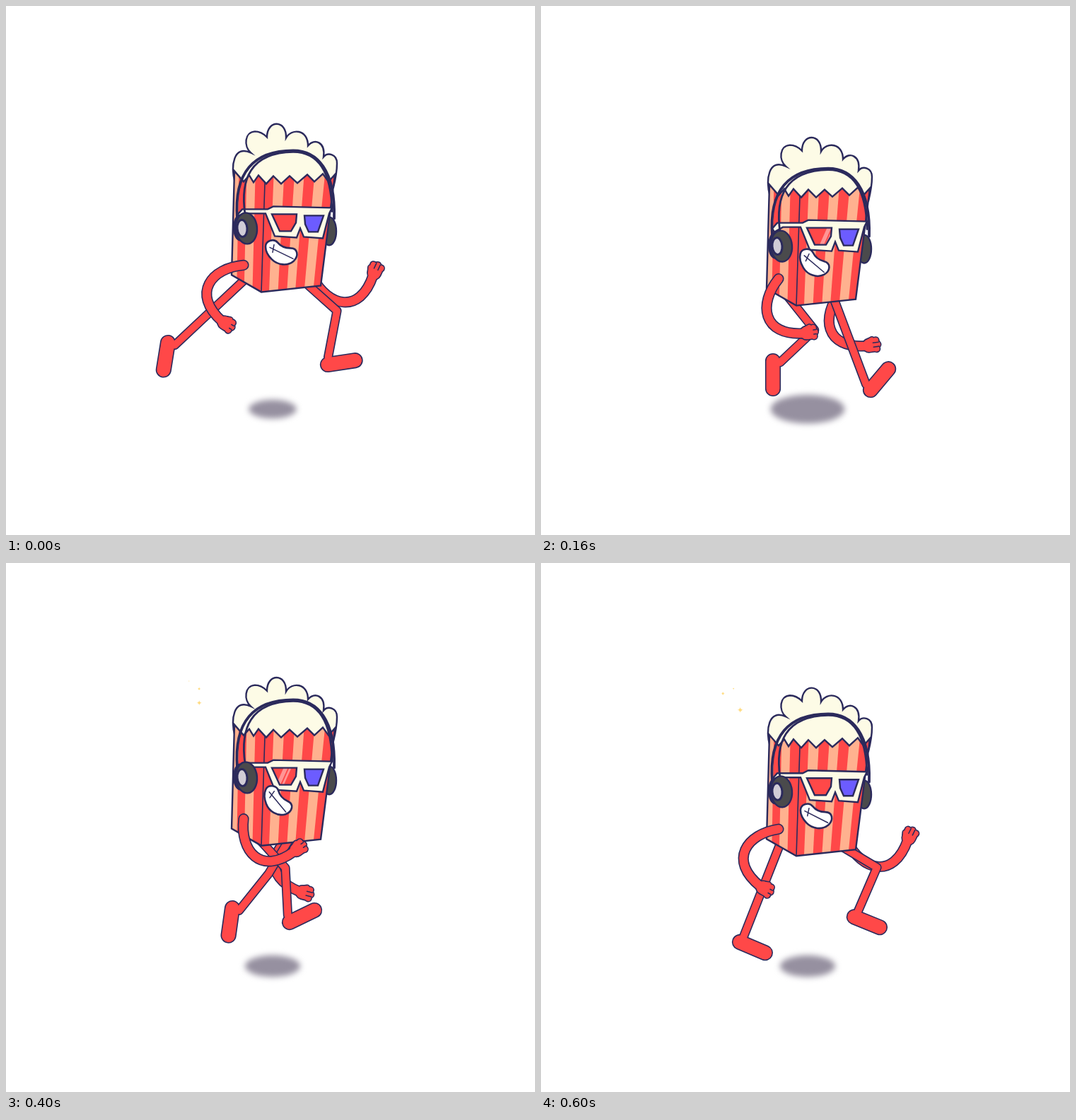
Recreate the animation shown at these times as an HTML page with a canvas. Size 748 by 748 pixels, loop 0.64 s.

```html
<!DOCTYPE html>
<html lang="en">
<head>
<meta charset="utf-8">
<title>Running popcorn</title>
<style>
html, body { margin: 0; width: 100%; height: 100%; overflow: hidden; background: #fff; }
canvas { display: block; }
</style>
</head>
<body>
<canvas id="stage" width="748" height="748"></canvas>
<script>
const ctx = document.getElementById('stage').getContext('2d');
const { sin, cos, PI, hypot, sqrt } = Math;
const NAVY = '#2b2a5c', RED = '#ff4848', PEACH = '#ffb18f', CREAM = '#fdfbe6';
const LOOP = 640, STEP = 40, BONE = 67;

// One stride of a foot: time, heel x from the hip, heel y, foot angle
const STRIDE = [
  [0, -116, 476, 1.73],
  [80, -91, 488, 1.71],
  [160, -17, 502, 1.57],
  [240, 17, 495, .96],
  [320, 44, 507, -.15],
  [400, 56, 508, -.45],
  [480, 55, 543, -.87],
  [560, -36, 547, .1],
  [600, -64, 536, .4]
];

const shape = d => new Path2D(d);
const popcorn = shape('M324 250C317 225 322 196 346 207C336 198 337 178 352 177Q361 177 369 185C369 160 397 160 396 186C404 172 427 174 427 197C436 186 452 192 449 213C455 206 468 209 468 222Q468 236 463 256Z');
const bag = shape('M323 233L336 248L344 239L350 249L357 239L368 251L378 240L389 251L401 240L412 250L426 238L436 248L448 237L456 248L465 238L445 395L361 404L319 380Z');
const glasses = shape('M327 295L334 287H370L378 283L461 285L457 293L448 328L421 326L416 314L411 327L380 325L367 293H342L330 300Z');
const mouth = shape('M-22-8C-22-17-10-20-5-14S6-6 13-6C24-6 25 5 18 12C9 20-5 18-13 10C-18 5-22-1-22-8Z');
const teeth = shape('M-16-7L17 9M-10-11L-12 0');
const bandOuter = shape('M327 300C322 235 350 204 406 204C440 204 466 232 464 300');
const bandInner = shape('M338 294C331 245 345 207 406 206C442 206 460 236 461 290');

// Lens, colour, glint position and the time it is seen
const lenses = [
  { path: shape('M376 294H411L410 306L403 318H387Z'), color: RED, x: 403, from: 160, to: 500 },
  { path: shape('M422 296H449L441 319H428L423 308Z'), color: '#6c5cff', x: 438, from: 200, to: 320 }
];

const angle = t => 2 * PI * t / LOOP;
const bob = t => 8 - 15 * cos(2 * angle(t - 35)) + 4 * cos(angle(t));

// Smooth periodic interpolation through the stride
function footAt(t) {
  const n = STRIDE.length;
  t = t % LOOP;
  let i = n - 1;
  while (STRIDE[i][0] > t) i--;
  const [a, b, c, d] = [-1, 0, 1, 2].map(k => {
    const j = i + k, [time, ...rest] = STRIDE[(j + n) % n];
    return [time + LOOP * Math.floor(j / n), ...rest];
  });
  const span = c[0] - b[0], u = (t - b[0]) / span, v = 1 - u;
  return [1, 2, 3].map(k => {
    const m1 = (c[k] - a[k]) / (c[0] - a[0]) * span;
    const m2 = (d[k] - b[k]) / (d[0] - b[0]) * span;
    return b[k] * (1 + 2 * u) * v * v + m1 * u * v * v + c[k] * u * u * (3 - 2 * u) - m2 * u * u * v;
  });
}

function paint(path, fill, line = 2.4) {
  if (fill) { ctx.fillStyle = fill; ctx.fill(path); }
  if (line) { ctx.strokeStyle = NAVY; ctx.lineWidth = line; ctx.stroke(path); }
}

function oval(x, y, rx, ry, tilt = 0) {
  const p = new Path2D();
  p.ellipse(x, y, rx, ry, tilt, 0, 2 * PI);
  return p;
}

// Strokes merged into one red shape with a common outline
function tube(parts) {
  for (const [color, extra] of [[NAVY, 3.2], [RED, 0]]) {
    ctx.strokeStyle = color;
    for (const [path, width] of parts) {
      ctx.lineWidth = width + extra;
      ctx.stroke(path);
    }
  }
}

// The knee follows from hip and ankle, always bending forward
function leg(t, x, hipY) {
  const [heelX, y, turn] = footAt(t);
  const c = cos(turn), s = sin(turn), ex = x + heelX;
  const hx = x - 7 * cos(angle(t));
  const ax = ex + 2 * c + 10 * s, ay = y + 2 * s - 10 * c;
  const dx = ax - hx, dy = ay - hipY, d = hypot(dx, dy);
  const bend = sqrt(Math.max(0, BONE * BONE - d * d / 4)) / d;
  const kx = hx + dx / 2 + bend * dy, ky = hipY + dy / 2 - bend * dx;
  tube([
    [shape(`M${hx} ${hipY}L${kx} ${ky}L${ax} ${ay}`), 10],
    [shape(`M${ex} ${y}L${ex + 39 * c} ${y + 39 * s}`), 19]
  ]);
}

// A curve of fixed shape swinging about the shoulder, with a fist at its end
function arm(x, y, swing, crease) {
  const frame = (ox, oy, turn) => (px, py) =>
    [ox + px * cos(turn) - py * sin(turn), oy + px * sin(turn) + py * cos(turn)];
  const along = frame(x, y, swing), wrist = along(85, 0);
  const hand = frame(...wrist, .85 * swing - 1.1);
  const line = (x1, y1, x2, y2) => shape(`M${hand(x1, y1)}L${hand(x2, y2)}`);
  const finger = fy => line(16 - Math.abs(fy) / 3, fy, 16.1 - Math.abs(fy) / 3, fy);
  tube([
    [shape(`M${x} ${y}C${along(20, 41)} ${along(64, 55)} ${wrist}`), 12],
    [line(4, 0, 10, 0), 18],
    [line(4, -6, 9, -8), 6],
    ...[-6, 0, 6].map(fy => [finger(fy), 8])
  ]);
  for (const fy of [-3, 3]) paint(line(18 - crease, fy, 18, fy), null, 1.6);
}

function stripes(x0, x1, top, bottom, spans) {
  const mix = ([l, r], f) => l + (r - l) * f;
  ctx.fillStyle = PEACH;
  for (const [a, b] of spans) {
    ctx.fill(shape(`M${mix(x0, a)} ${top}L${mix(x0, b)} ${top}L${mix(x1, b)} ${bottom}L${mix(x1, a)} ${bottom}Z`));
  }
}

function drawBag() {
  paint(popcorn, CREAM);
  paint(bag, RED, 0);
  ctx.save();
  ctx.clip(bag);
  stripes([322, 366], [319, 361], 230, 405, [[0, .17], [.42, .7]]);
  stripes([366, 464], [361, 445], 235, 405, [[.13, .28], [.43, .57], [.72, .87]]);
  ctx.restore();
  paint(bag);
  paint(shape('M366 250L361 404'), null, 1.6);
}

function drawFace(t) {
  paint(glasses, CREAM);
  for (const { path, color, x, from, to } of lenses) {
    paint(path, color, 0);
    if (t >= from && t < to) {
      const gx = x - .05 * (t - from);
      ctx.save();
      ctx.clip(path);
      ctx.fillStyle = 'rgba(255,255,255,.42)';
      ctx.fill(shape(`M${gx + 2} 293h6l-12 27h-6ZM${gx + 10} 293h3l-12 27h-3Z`));
      ctx.restore();
    }
    paint(path);
  }
  const tilt = .25 - .25 * cos(angle(t));
  ctx.save();
  ctx.translate(389 - 12 * tilt, 348 - 16 * tilt);
  ctx.rotate(tilt);
  paint(mouth, '#fff', 2.6);
  paint(teeth, null, 1.5);
  ctx.restore();
}

function drawHeadphones() {
  paint(bandOuter, null, 3.8);
  paint(bandInner, null, 2.8);
  paint(oval(331, 313, 9, 18), NAVY, 2);
  paint(oval(340, 314, 15, 22, -.08), '#4a4a4c');
  paint(oval(334, 314, 7, 12, -.08), '#d0ccd6', 3);
}

// Sparks leave the popcorn up and to the left while they shrink
function drawSparks(t) {
  let seed = 5;
  const random = () => (seed = seed * 16807 % 2147483647) / 2147483647;
  for (let born = 200; born < 600; born += 55) {
    const x = 275 + 45 * random(), y = 200 + 18 * random(), life = (t - born) / 170;
    if (life < 0 || life >= 1) continue;
    const px = x - 60 * life, py = y - 45 * life, r = 5 * (1 - life);
    ctx.fillStyle = '#ffdc84';
    ctx.fill(shape(`M${px} ${py - r}Q${px} ${py} ${px + r} ${py}Q${px} ${py} ${px} ${py + r}Q${px} ${py} ${px - r} ${py}Q${px} ${py} ${px} ${py - r}`));
    ctx.fill(oval(px, py, r * .45, r * .45));
  }
}

function draw(t) {
  const a = angle(t), dy = bob(t);
  const lag = 6 * sin(a) - 2 * sin(2 * a);
  const radius = 43 - 10 * cos(2 * angle(t - 20));
  ctx.clearRect(0, 0, 748, 748);
  ctx.lineCap = ctx.lineJoin = 'round';

  ctx.filter = 'blur(4.5px)';
  paint(oval(377, 570, radius, radius * .39), '#9690a0', 0);
  ctx.filter = 'none';

  drawSparks(t);
  arm(424 + 10 * cos(a), 384 + dy, .98 - 1.03 * cos(a + .15), 8);
  leg(t + LOOP / 2, 411, 386 + dy);
  leg(t, 345, 386 + dy);

  ctx.save();
  ctx.lineJoin = 'miter';
  ctx.translate(0, dy + lag);
  paint(oval(457, 318, 10, 20), '#4a4a4c');
  ctx.translate(0, -lag);
  drawBag();
  drawFace(t);
  ctx.translate(0, lag);
  drawHeadphones();
  ctx.restore();

  arm(336, 366 + dy, 1.14 + .8 * cos(a), 4);
}

function tick() {
  draw(Math.floor(performance.now() % LOOP / STEP) * STEP);
  requestAnimationFrame(tick);
}
tick();
</script>
</body>
</html>
```
